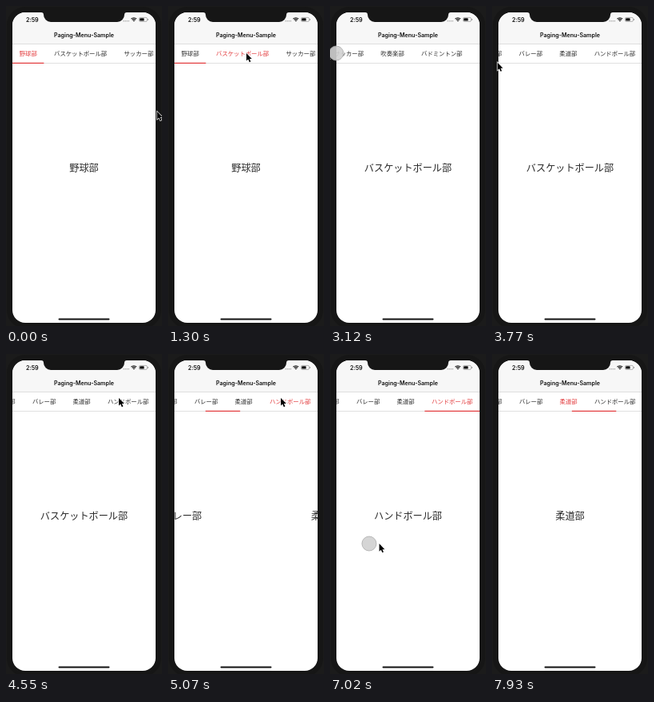
Recreate the animation shown at these times as an HTML page with a canvas. Size 195 px wide and 400 px high, loop 8 s.

```html
<!DOCTYPE html>
<html lang="ja">
<head>
<meta charset="utf-8">
<title>Paging menu</title>
<style>
  html, body { margin: 0; width: 100%; height: 100%; overflow: hidden; background: #1b1b1b; }
  canvas { display: block; width: 195px; height: 400px; }
</style>
</head>
<body>
<canvas id="stage"></canvas>
<script>
const LOOP = 8000, STEP = 130;
const CJK = '"Noto Sans CJK JP", "Noto Sans CJK", "Noto Sans", sans-serif';
const LATIN = 'Inter, "Liberation Sans", sans-serif';
const RED = '#e2383a', INK = '#2a2a2a', BEZEL = '#161616';
const LEFT = 8, TOP = 8, WIDTH = 179, HEIGHT = 388, CENTER = LEFT + WIDTH / 2;
const MENU_SIZE = 7.35, GAP = 21.3, BAR_PAD = 8.6;

let nextX = 16.7;
const items = ['野球部', 'バスケットボール部', 'サッカー部', '吹奏楽部',
  'バドミントン部', 'バレー部', '柔道部', 'ハンドボール部'].map(name => {
  const item = { name, x: nextX, w: name.length * MENU_SIZE };
  nextX += item.w + GAP;
  return item;
});
const MAX_SCROLL = nextX - GAP + BAR_PAD - LEFT - WIDTH;

const mix = (a, b, k) => a + (b - a) * k;
const span = (t, from, to) => Math.min(1, Math.max(0, (t - from) / (to - from)));
const smooth = k => k * k * (3 - 2 * k);
const easeOut = k => 1 - (1 - k) ** 3;

// Moves smoothly from one resting value to the next.
const glide = (t, start, moves) => moves.reduce(
  (v, [from, to, goal]) => mix(v, goal, smooth(span(t, from, to))), start);

const pointerMoves = [
  [0, 650, { x: 20, y: 60 }],
  [780, 1040, { x: 98, y: 59 }],
  [1690, 2210, { x: 146, y: 53 }],
  [2210, 2470, { x: 150, y: 59 }],
  [2470, 3250, { x: -20, y: 59 }],
  [3250, 3900, { x: 10, y: 72 }],
  [3900, 4550, { x: 141, y: 55 }],
  [5460, 5980, { x: 74, y: 235 }],
  [5980, 6890, { x: 46, y: 237 }],
  [6900, 7520, { x: 205, y: 238 }]
];
const along = (t, axis, start) =>
  glide(t, start, pointerMoves.map(([from, to, goal]) => [from, to, goal[axis]]));
const pointerAt = t => ({ x: along(t, 'x', 189), y: along(t, 'y', 132) });

// The touch spot trails the pointer a little.
const fingerAt = t => pointerAt(t - 70);
const touches = [[650, 910], [1040, 1300], [2470, 3250], [4680, 4810], [6890, 7540]];

const DRAG = 2470, RELEASE = 3120, REST = 3900;
function scrollAt(t) {
  const dragged = t < DRAG ? 0 : 150 - fingerAt(Math.min(t, RELEASE)).x;
  const flung = mix(dragged, MAX_SCROLL, easeOut(span(t, RELEASE, REST)));
  return flung - smooth(span(t, 7020, 7930));
}

const tapMoves = [[1300, 1690, 1], [4810, 5200, 7]];
const pageAt = t => glide(t, 0, [...tapMoves, [7020, 7800, 6]]);
const barAt = t => glide(t, 0, [...tapMoves, [7020, 7930, 6.55]]);
const selectedAt = t => t < 1300 ? 0 : t < 4810 ? 1 : t < 7670 ? 7 : 6;

const canvas = document.getElementById('stage');
const ctx = canvas.getContext('2d');
const ratio = window.devicePixelRatio || 1;
canvas.width = 195 * ratio;
canvas.height = 400 * ratio;

function rect(x, y, w, h, color) {
  ctx.fillStyle = color;
  ctx.fillRect(x, y, w, h);
}
function rounded(x, y, w, h, r, color) {
  ctx.beginPath();
  ctx.roundRect(x, y, w, h, r);
  ctx.fillStyle = color;
  ctx.fill();
}
function text(str, x, y, font, color, align = 'left') {
  ctx.font = font;
  ctx.textAlign = align;
  ctx.fillStyle = color;
  ctx.fillText(str, x, y);
}

function drawStatus() {
  text('2:59', 32.8, 19.7, `600 7.2px ${LATIN}`, '#111', 'center');
  for (let i = 0; i < 4; i++) rect(146.5 + i * 2.1, 18.2, 1.2, 1.2, '#999');
  ctx.strokeStyle = '#111';
  ctx.lineWidth = 1.1;
  for (const r of [1.2, 3, 4.8]) {
    ctx.beginPath();
    ctx.arc(159.8, 19.6, r, -Math.PI * .75, -Math.PI * .25);
    ctx.stroke();
  }
  ctx.lineWidth = .6;
  ctx.strokeStyle = '#888';
  ctx.beginPath();
  ctx.roundRect(166.4, 14.4, 10, 5, 1.4);
  ctx.stroke();
  rounded(167.2, 15.2, 5.4, 3.4, .7, '#111');
  rect(177, 16, .8, 1.8, '#888');
}

function drawMenu(t) {
  const scroll = scrollAt(t), selected = selectedAt(t), pos = barAt(t);
  rect(LEFT, 71, WIDTH, 1, '#e0e0e0');
  items.forEach((item, i) => text(item.name, item.x - scroll, 61.9,
    `${MENU_SIZE}px ${CJK}`, i === selected ? RED : INK));

  const a = items[Math.floor(pos)], b = items[Math.ceil(pos)], k = pos % 1;
  rect(mix(a.x, b.x, k) - BAR_PAD - scroll, 70.8,
    mix(a.w, b.w, k) + 2 * BAR_PAD, 1.2, RED);
}

function drawPages(t) {
  const current = pageAt(t);
  items.forEach((item, i) => text(item.name, CENTER + (i - current) * WIDTH, 206.5,
    `12.15px ${CJK}`, INK, 'center'));
}

function drawNotch() {
  ctx.beginPath();
  ctx.moveTo(44, 7);
  ctx.lineTo(44, 8);
  ctx.quadraticCurveTo(47, 8, 47, 11);
  ctx.arcTo(47, 20, 56, 20, 9);
  ctx.arcTo(148, 20, 148, 11, 9);
  ctx.lineTo(148, 11);
  ctx.quadraticCurveTo(148, 8, 151, 8);
  ctx.lineTo(151, 7);
  ctx.fillStyle = BEZEL;
  ctx.fill();
}

function drawFinger(t) {
  if (!touches.some(([from, to]) => t >= from && t < to)) return;
  const { x, y } = fingerAt(t);
  ctx.beginPath();
  ctx.arc(x, y, 9, 0, Math.PI * 2);
  ctx.fillStyle = 'rgba(208,208,208,.9)';
  ctx.fill();
  ctx.lineWidth = .8;
  ctx.strokeStyle = '#aaa';
  ctx.stroke();
}

function drawPointer(t) {
  const { x, y } = pointerAt(t);
  ctx.save();
  ctx.translate(x, y);
  const arrow = new Path2D('M0 0V9.6L2.2 7.6 3.8 11.2 5.4 10.5 3.9 7.1H6.8Z');
  ctx.lineWidth = 1.3;
  ctx.strokeStyle = '#fff';
  ctx.stroke(arrow);
  ctx.fillStyle = '#000';
  ctx.fill(arrow);
  ctx.restore();
}

function draw(t) {
  ctx.setTransform(ratio, 0, 0, ratio, 0, 0);
  rect(0, 0, 195, 400, '#1b1b1b');
  rounded(1, 1, 193, 402, 23, BEZEL);
  ctx.save();
  ctx.beginPath();
  ctx.roundRect(LEFT, TOP, WIDTH, HEIGHT, 16);
  ctx.clip();
  rect(LEFT, TOP, WIDTH, HEIGHT, '#fff');
  rect(LEFT, TOP, WIDTH, 39, '#f7f7f7');
  rect(LEFT, 47, WIDTH, 1, '#dedede');
  drawStatus();
  text('Paging-Menu-Sample', CENTER, 39.2, `600 7.1px ${LATIN}`, '#111', 'center');
  drawMenu(t);
  drawPages(t);
  rounded(65.5, 390.4, 64, 2, 1, '#111');
  ctx.restore();
  drawNotch();
  drawFinger(t);
  drawPointer(t);
}

const start = performance.now();
function tick() {
  const t = (performance.now() - start) % LOOP;
  draw(Math.floor(t / STEP) * STEP);
  requestAnimationFrame(tick);
}
tick();
</script>
</body>
</html>
```
